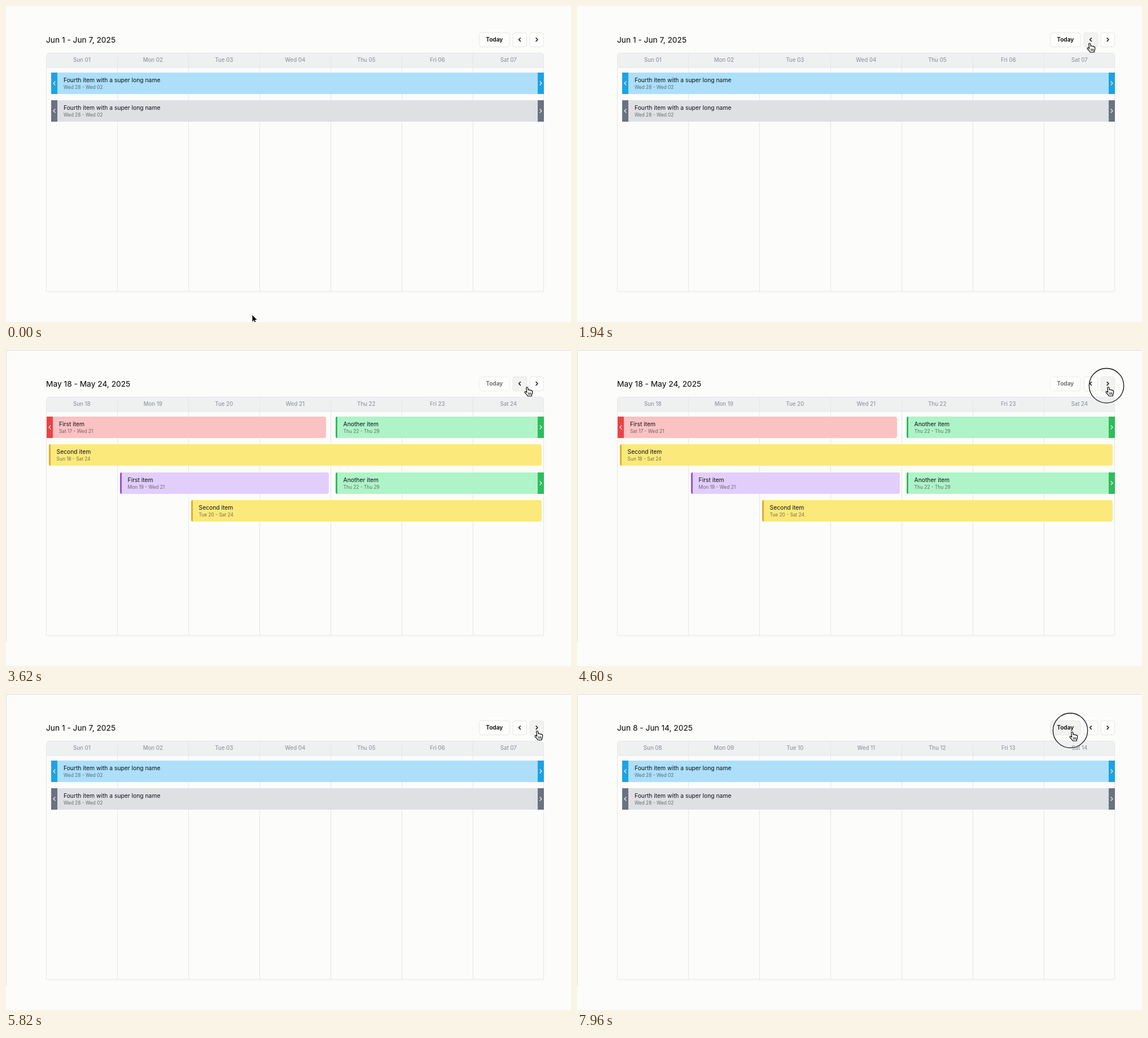
Write an HTML page that moves like this. It is 1001 px wide and 560 px high and loops after 8000 ms.

```html
<!DOCTYPE html>
<html lang="en">
<head>
<meta charset="utf-8">
<title>Week calendar</title>
<style>
html, body { margin: 0; width: 100%; height: 100%; overflow: hidden; background: #fcfcfa; }
svg { display: block; width: 1001px; height: 560px; font-family: Inter, "Open Sans", sans-serif; }
.line { fill: none; stroke: #e5e5ef; }
.title { font-size: 13.75px; }
.day { font-size: 9.7px; font-weight: 500; fill: #9299a5; text-anchor: middle; }
.name { font-size: 10.3px; fill: #0b0f19; }
.dates { font-size: 8.35px; fill: #000; fill-opacity: .52; }
.today { font-size: 10.1px; font-weight: 600; text-anchor: middle; }
.chev { fill: none; stroke: #fff; stroke-width: 1.2; stroke-linecap: round; stroke-linejoin: round; }
.btn rect { fill: #fefefd; stroke: #e6e6ec; }
.btn.hover rect { fill: #f2f2ef; }
.btn .chev { stroke: #000; stroke-width: 1.4; }
</style>
</head>
<body>
<svg viewBox="0 0 1001 560">
  <path id="edge" d="M0 .5H1001M.5 0V517" fill="none" stroke="#dcdcdc"/>
  <g id="week"></g>
  <g id="buttons"></g>
  <circle id="ring" fill="none" stroke="#111" stroke-width="1.3"/>
  <path id="arrow" d="M0 0V13L3 10.3L5 15L7.2 14L5.2 9.5H9.3Z" stroke="#fff" stroke-width=".8"/>
  <g id="hand" stroke="#000" stroke-width="1.2" stroke-linejoin="round" stroke-linecap="round">
    <path fill="#fff" d="M-1.3 1.2C-1.3-.4 1.3-.4 1.5 1.2L2.3 5.2C3.1 4.4 4.7 4.6 5 5.6C5.9 4.9 7.3 5.3 7.5 6.3C8.6 5.9 9.7 6.6 9.7 8C9.8 11 9.3 12.5 8.3 14L8.2 16H1.3C.5 14-1.5 12.5-3.7 9.8C-4.6 8.4-3 7.2-1.7 8.3L-.3 9.6Z"/>
    <path d="M2.7 10v3.4M4.7 10v3.4M6.7 10v3.4" stroke-width=".9"/>
  </g>
</svg>
<script>
const LOOP = 8000, RIGHT = 953;
const $ = id => document.getElementById(id);

// accent, fill
const COLORS = {
  sky: ['#1fa2e1', '#addffa'], gray: ['#6b7280', '#dfe0e4'],
  green: ['#2ebd5d', '#aff3c8'], blue: ['#3574d8', '#b5d3f9'],
  red: ['#e94444', '#fac2c2'], yellow: ['#e0ad2c', '#fce97c'],
  purple: ['#9c4fd8', '#e2cefa']
};
const LONG = 'Fourth item with a super long name', LONG_DATES = 'Wed 28 - Wed 02';
const ANOTHER = 'Another item', THU = 'Thu 22 - Thu 29';

// row, x from, x to, colour, name, dates, continues from the week before
const june = [
  [0, 80, RIGHT, 'sky', LONG, LONG_DATES, true],
  [1, 80, RIGHT, 'gray', LONG, LONG_DATES, true]
];
const may18 = [
  [0, 72, 567, 'red', 'First item', 'Sat 17 - Wed 21', true],
  [0, 584, RIGHT, 'green', ANOTHER, THU],
  [1, 76, 949, 'yellow', 'Second item', 'Sun 18 - Sat 24'],
  [2, 202, 572, 'purple', 'First item', 'Mon 19 - Wed 21'],
  [2, 584, RIGHT, 'green', ANOTHER, THU],
  [3, 328, 949, 'yellow', 'Second item', 'Tue 20 - Sat 24']
];
const may25 = [
  [0, 72, 693, 'green', ANOTHER, THU, true],
  [0, 705.5, 823.5, 'blue', ANOTHER, 'Fri 30'],
  [1, 72, 693, 'green', ANOTHER, THU, true],
  [2, 202, 320, 'blue', ANOTHER, 'Mon 26'],
  [2, 458, RIGHT, 'sky', LONG, LONG_DATES],
  [3, 458, RIGHT, 'gray', LONG, LONG_DATES]
];
const WEEKS = [may18, may25, june, june];

// press time, week shown after the release
const CLICKS = [[1960, 1], [2820, 0], [4480, 1], [5240, 2], [6060, 3], [7780, 0]];
const RELEASE = 130, RING = 300;

// time, x, y of the pointer tip
const PATH = [
  [0, 436, 547], [840, 886, 69], [920, 888, 68], [1250, 908, 66],
  [3460, 908, 66], [3800, 941, 65.5], [6820, 941, 65.5], [7460, 877, 67], [LOOP, 877, 67]
];

const text = (cls, x, y, s) => `<text class="${cls}" x="${x}" y="${y}">${s}</text>`;
const chevron = (x, y, dir, h = 3) =>
  `<path class="chev" d="M${x - dir * h / 2} ${y - h}l${dir * h} ${h}l${-dir * h} ${h}"/>`;

// rectangle with its own radius on the left and right corners
function box(x, y, w, h, l, r, fill) {
  return `<path fill="${fill}" d="M${x + l} ${y}H${x + w - r}q${r} 0 ${r} ${r}V${y + h - r}q0 ${r} ${-r} ${r}` +
    `H${x + l}q${-l} 0 ${-l} ${-l}V${y + l}q0 ${-l} ${l} ${-l}Z"/>`;
}

function bar([row, x1, x2, color, name, dates, before]) {
  const y = Math.round(118 + 49.4 * row), h = 38, mid = y + h / 2 - .2;
  const [accent, fill] = COLORS[color], after = x2 === RIGHT;
  const tx = x1 + (before ? 22 : 13.6);
  let s = box(x1, y, x2 - x1, h, before ? 0 : 4, after ? 0 : 4, fill);
  s += before
    ? box(x1, y, 11, h, 0, 0, accent) + chevron(x1 + 5.5, mid, -1)
    : box(x1, y, 3, h, 3, 0, accent);
  if (after) s += box(x2 - 11, y, 11, h, 0, 0, accent) + chevron(x2 - 5.5, mid, 1);
  return s + text('name', tx, y + 16.8, name) + text('dates', tx, y + 28.6, dates);
}

function weekView(n) {
  const date = i => new Date(2025, 4, 18 + 7 * n + i);
  const part = (d, o) => d.toLocaleDateString('en-US', o);
  const md = { month: 'short', day: 'numeric' };
  let s = text('title', 71, 64.8, `${part(date(0), md)} - ${part(date(6), md)}, 2025`);
  s += '<path fill="#eff0f0" d="M71.5 109V89.5q0-6 6-6H947q6 0 6 6V109Z"/>';
  s += '<path class="line" d="M71.5 506V89.5q0-6 6-6H946.5q6 0 6 6V506ZM71.5 109H952.5"/>';
  for (let i = 0; i < 7; i++) {
    const x = 71.5 + 126 * i;
    if (i) s += `<path class="line" d="M${x} 84V506"/>`;
    s += text('day', x + 62.8, 99.4, part(date(i), { weekday: 'short' }) + ' ' + String(date(i).getDate()).padStart(2, 0));
  }
  return s + WEEKS[n].map(bar).join('');
}

function buttonsView(n, hover) {
  const button = (i, x, w, inner) =>
    `<g class="btn ${hover === i ? 'hover' : ''}" opacity="${i === 0 && n === 0 ? .6 : 1}">` +
    `<rect x="${x}" y="47.5" width="${w}" height="25" rx="4"/>${inner}</g>`;
  return button(0, 838.5, 53.5, text('today', 865.3, 63.2, 'Today')) +
    button(1, 898, 24.5, chevron(910, 59.6, -1, 2.9)) +
    button(2, 928, 24.5, chevron(940.5, 59.6, 1, 2.9));
}

function pointer(t) {
  const i = PATH.findIndex(p => p[0] > t);
  const [t0, x0, y0] = PATH[i - 1], [t1, x1, y1] = PATH[i];
  const u = (t - t0) / (t1 - t0), e = u * u * (3 - 2 * u);
  return [x0 + (x1 - x0) * e, y0 + (y1 - y0) * e];
}

function hovered(x, y) {
  if (y < 47 || y > 73) return -1;
  return [[838, 892], [898, 925], [928, 953]].findIndex(([a, b]) => x >= a && x <= b);
}

let shown = '', shownWeek = -1;

function draw(now) {
  const t = now % LOOP;
  const week = CLICKS.reduce((w, [at, next]) => t >= at + RELEASE ? next : w, 2);
  // the last press is not yet released when the loop ends
  const current = t >= CLICKS[5][0] ? 3 : week;
  const [x, y] = pointer(t), hover = hovered(x, y);

  if (current !== shownWeek) $('week').innerHTML = weekView(shownWeek = current);
  const key = current + ':' + hover;
  if (key !== shown) {
    $('buttons').innerHTML = buttonsView(current, hover);
    shown = key;
  }

  const place = `translate(${x} ${y})`;
  $('arrow').setAttribute('transform', place);
  $('hand').setAttribute('transform', place);
  $('arrow').style.display = hover < 0 ? '' : 'none';
  $('hand').style.display = hover < 0 ? 'none' : '';
  $('edge').style.display = t < CLICKS[0][0] ? 'none' : '';

  const press = CLICKS.find(([at]) => t >= at && t < at + RING);
  $('ring').style.display = press ? '' : 'none';
  if (press) {
    const age = t - press[0];
    $('ring').setAttribute('cx', x - 3);
    $('ring').setAttribute('cy', y - 2.3);
    $('ring').setAttribute('r', 30.7 + 3.5 * Math.max(0, 1 - age / 60));
    $('ring').setAttribute('opacity', Math.min(1, (RING - age) / 80));
  }
}

let begin;
function tick(now) {
  begin ??= now;
  draw(now - begin);
  requestAnimationFrame(tick);
}
draw(0);
requestAnimationFrame(tick);
</script>
</body>
</html>
```
